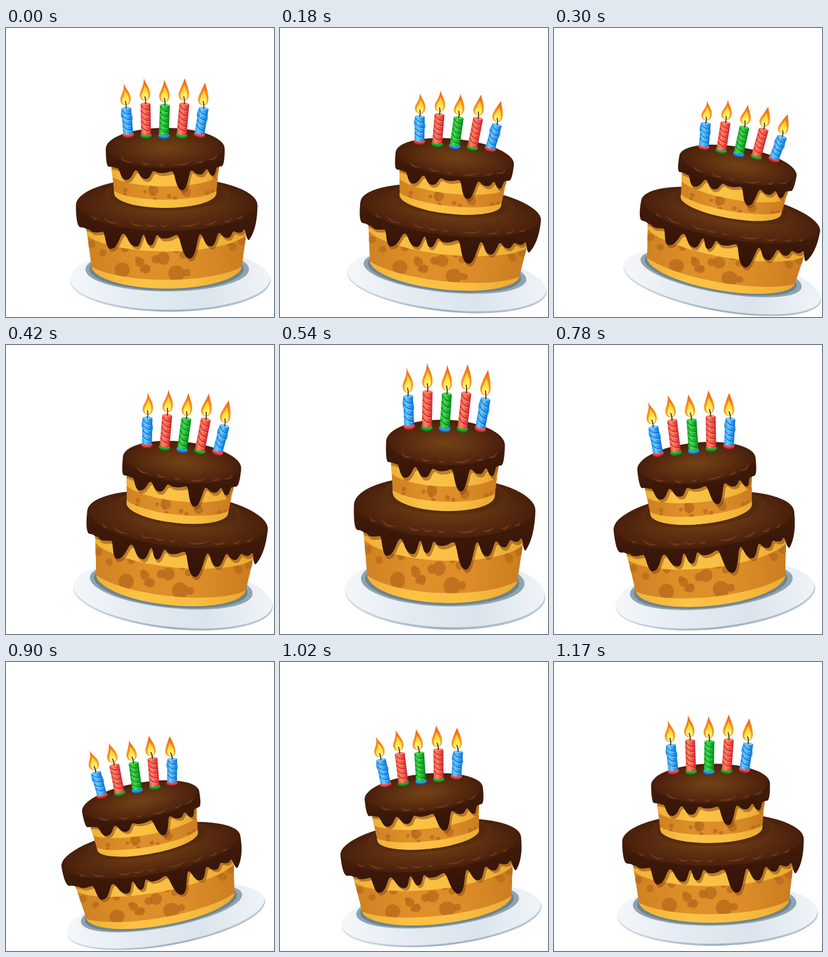
An HTML page that plays this animation: 462x498 px, repeating every 1200 ms.

```html
<!DOCTYPE html>
<html lang="en">
<head>
<meta charset="utf-8">
<title>Dancing cake</title>
<style>
html, body { margin: 0; width: 100%; height: 100%; overflow: hidden; background: #fff; }
svg { display: block; width: 462px; height: 498px; }
</style>
</head>
<body>
<svg id="stage" viewBox="0 0 462 498" xmlns="http://www.w3.org/2000/svg"></svg>
<script>
const stage = document.getElementById('stage');

// Evenly spaced colour stops.
const gradient = (id, colors, attrs = '', kind = 'linear') =>
  `<${kind}Gradient id="${id}" ${attrs}>` +
  colors.map((c, i) => `<stop offset="${i / (colors.length - 1)}" stop-color="${c}"/>`).join('') +
  `</${kind}Gradient>`;
const down = 'x2="0" y2="1"';

const path = (d, fill, more = '') => `<path d="${d}" fill="${fill}" ${more}/>`;
const oval = (x, y, rx, ry, fill, more = '') =>
  `<ellipse cx="${x}" cy="${y}" rx="${rx}" ry="${ry}" fill="${fill}" ${more}/>`;

function randomizer(seed) {
  return () => (seed = seed * 16807 % 2147483647) / 2147483647;
}

// Half-ellipse profile: 1 in the middle, 0 at both ends.
const bulge = (x, cx, rx) => Math.sqrt(Math.max(0, 1 - ((x - cx) / rx) ** 2));

// Wide round drips with narrow gaps halfway between them.
function drips(tips, hem) {
  let d = '';
  for (let i = 1; i < tips.length; i++) {
    const [x0, len0] = tips[i - 1], [x1, len1] = tips[i];
    const mid = (x0 + x1) / 2, y = hem(mid), half = mid - x0;
    const y0 = hem(x0) + len0, y1 = hem(x1) + len1;
    d += `C${x0 + half * .65} ${y0} ${x0 + half * .7} ${y} ${mid} ${y}` +
      `C${x1 - half * .7} ${y} ${x1 - half * .65} ${y1} ${x1} ${y1}`;
  }
  return d;
}

function shine(x, len, { cx, fy, rx, ry }) {
  const u = (x - cx) / rx, w = 5 + len * .35;
  return path(`M${-w} -2Q0 10 ${w} -2Q0 4 ${-w} -2Z`, '#80492a',
    `opacity=".6" transform="translate(${x} ${fy + ry * .72 * bulge(x, cx, rx)}) rotate(${-u * 35})"`);
}

function spots({ cx, base, foot, bow, band, big, seed }) {
  const rnd = randomizer(seed), all = [...big];
  for (let i = 0; i < 16; i++) {
    const x = cx + (rnd() * 2 - 1) * foot;
    const y = base - band * (.3 + rnd() * .9) + bow * bulge(x, cx, foot);
    all.push([x, y, band * (.06 + rnd() * .07)]);
  }
  return all.map(([x, y, r]) => oval(x, y, r, r, '#b96c1c', 'opacity=".8"')).join('');
}

function tier(t) {
  const { id, cx, fy, rx, ry, base, foot, bow, band, stripe, tips, sag } = t;
  const wide = foot + band * .22;
  const side = `M${cx - wide} ${fy}L${cx - foot} ${base}A${foot} ${bow} 0 0 0 ${cx + foot} ${base}L${cx + wide} ${fy}Z`;
  const arc = (y, to) => `M${cx - wide} ${y}A${wide} ${bow} 0 0 0 ${cx + wide} ${y}V${to}H${cx - wide}Z`;
  const hem = x => t.hem + sag * bulge(x, cx, rx);
  const [x0, len0] = tips[0], [x1, len1] = tips[tips.length - 1];
  const icing = `M${cx - rx} ${fy}Q${cx - rx} ${hem(x0)} ${x0} ${hem(x0) + len0}` + drips(tips, hem) +
    `Q${cx + rx} ${hem(x1)} ${cx + rx} ${fy}A${rx} ${ry} 0 0 0 ${cx - rx} ${fy}Z`;
  return `<clipPath id="${id}"><path d="${side}"/></clipPath><g clip-path="url(#${id})">` +
    path(side, 'url(#sponge)') + spots(t) +
    path(arc(base - band, fy), 'url(#cream)') +
    path(arc(base - stripe, base + bow * 2), 'url(#cream)') +
    path(icing, '#8a4a12', 'opacity=".55" transform="translate(3 5)"') + '</g>' +
    path(icing, 'url(#icing)') +
    oval(cx, fy - 1, rx - 4, ry - 2, 'url(#face)') +
    tips.slice(1, -1).map(([x, len]) => shine(x, len, t)).join('');
}

const lowerTier = {
  id: 'low', cx: 277, fy: 305, rx: 156.5, ry: 48, base: 409, foot: 130, bow: 40,
  band: 64, stripe: 15, hem: 337, sag: 20, seed: 71,
  tips: [[129, 0], [154, 3], [180, 28], [225, 21], [249, 18], [272, 6], [317, 41], [353, 22],
    [382, 10], [403, 4], [419, 20]],
  big: [[294, 423, 14], [200, 417, 13], [271, 397, 11], [231, 404, 8]]
};

const upperTier = {
  id: 'high', cx: 274.5, fy: 208, rx: 102.5, ry: 36, base: 285, foot: 88, bow: 25,
  band: 37, stripe: 14, hem: 234, sag: 13, seed: 29,
  tips: [[177, 1], [207, 18], [241, 14], [268, 3], [304, 33], [335, 8], [357, 13], [371, 0]],
  big: [[254, 280, 9], [311, 283, 8]]
};

const waxes = {
  blue: { main: '#2b9df2', dark: '#1270cc', light: '#74c8fb', tall: 48 },
  red: { main: '#f2503e', dark: '#c6243a', light: '#fb8666', tall: 57 },
  green: { main: '#14b42c', dark: '#07861c', light: '#4fd455', tall: 55 }
};
const waxOrder = ['blue', 'red', 'green', 'red', 'blue'];
const ringOrder = ['red', 'green', 'blue', 'green', 'red'];

function candle(name, n) {
  const i = n - 2, wax = waxes[name], ring = waxes[ringOrder[n]];
  const bx = 272 + i * 30.5, by = 187 - i * i * .4;
  const tx = 274 + i * 33.5, ty = by - wax.tall;
  const tilt = Math.atan2(tx - bx, wax.tall) * 180 / Math.PI;
  let wrap = '';
  for (let y = 8; y < wax.tall - 5; y += 9) {
    wrap += path(`M-8 ${y - 4}Q-1 ${y + 5} 8 ${y + 4}`, 'none', `stroke="${wax.dark}" stroke-width="1.6"`) +
      path(`M-7 ${y - 1}Q-1 ${y + 6} 6 ${y + 6}`, 'none', `stroke="${wax.light}" stroke-width="1.3"`);
  }
  const drop = name === 'blue' ? path('M-8 3Q-12 14 -8 19ZM8 10Q12 20 8 24Z', wax.main) : '';
  const stick = oval(0, wax.tall - 1, 10, 5, ring.dark) +
    oval(0, wax.tall - 2.5, 9.5, 4, ring.main) +
    path(`M-8.5 1V${wax.tall - 4}Q0 ${wax.tall + 1} 8.5 ${wax.tall - 4}V1Q0 -4 -8.5 1Z`, `url(#${name})`) +
    wrap + drop + oval(0, 1, 7.5, 2.2, wax.light);
  const lean = i * 1.7;
  const flame =
    path(`M0 0C-9 -1 -11 -10 -7 -18C-4 -25 -2 -29 ${lean} -39C${lean + 2} -30 9 -23 9 -12C9 -5 6 0 0 0Z`, 'url(#fire)') +
    path(`M0 -1C-6 -2 -7 -9 -4 -15C-2 -19 -1 -22 ${lean / 2} -27C3 -20 6 -16 6 -10C6 -4 4 -1 0 -1Z`, 'url(#glow)');
  return `<g transform="translate(${tx} ${ty}) rotate(${tilt})">${stick}</g>` +
    `<g transform="translate(${tx - 1} ${ty - 4})">${flame}</g>` +
    path(`M${tx} ${ty + 1}q1 -6 -1 -12`, 'none', 'stroke="#352018" stroke-width="1.6" stroke-linecap="round"');
}

stage.innerHTML = '<defs>' +
  Object.entries(waxes).map(([name, w]) => gradient(name, [w.main, w.light, w.main, w.dark])).join('') +
  gradient('plate', ['#f4f7fa', '#e4ebf2', '#dbe4ed', '#f0f4f8']) +
  gradient('rim', ['#d5dee6', '#9eb1c0', '#b9c9d6']) +
  gradient('sponge', ['#cd8022', '#de9029', '#dc8d29', '#c97b1f']) +
  gradient('cream', ['#eeae36', '#fbc346', '#f8bd41', '#e8a630']) +
  gradient('icing', ['#4d240c', '#3f1a09', '#331207'], down) +
  gradient('face', ['#734114', '#673813', '#5a2c10', '#4a200c'], '', 'radial') +
  gradient('shade', ['#34160a', '#3c1b0a', '#5a2e11'], '', 'radial') +
  gradient('fire', ['#ee5a1d', '#f78f1f', '#f9a824'], down) +
  gradient('glow', ['#ffc52e', '#ffe446', '#fff6a6'], down) +
  '</defs><g id="cake">' +
  oval(283, 435, 173, 54, 'url(#rim)') +
  oval(282.5, 432, 172.5, 53.5, 'url(#plate)') +
  oval(278, 416, 141, 38, '#8fa4b0') +
  oval(277, 415, 133, 37, '#6c838f') +
  tier(lowerTier) +
  oval(278, 286, 108, 29, 'url(#shade)', 'opacity=".8"') +
  tier(upperTier) +
  waxOrder.map(candle).join('') + '</g>';

const cake = document.getElementById('cake');
const LOOP = 1200, STEP = 30, BEAT = 300;
const leans = [0, 10, 0, -10, 0];
const stretches = [1, .9, 1.2, .9, 1];

function at(keys, t) {
  const i = Math.floor(t / BEAT), k = t / BEAT - i;
  return keys[i] + (keys[i + 1] - keys[i]) * k;
}

function draw(ms) {
  const t = Math.floor((ms % LOOP) / STEP) * STEP;
  cake.setAttribute('transform',
    `translate(283 480) rotate(${at(leans, t)}) scale(1 ${at(stretches, t)}) translate(-283 -480)`);
}

let start;
function tick(now) {
  if (start === undefined) start = now;
  draw(Math.max(0, now - start));
  requestAnimationFrame(tick);
}
draw(0);
requestAnimationFrame(tick);
</script>
</body>
</html>
```
